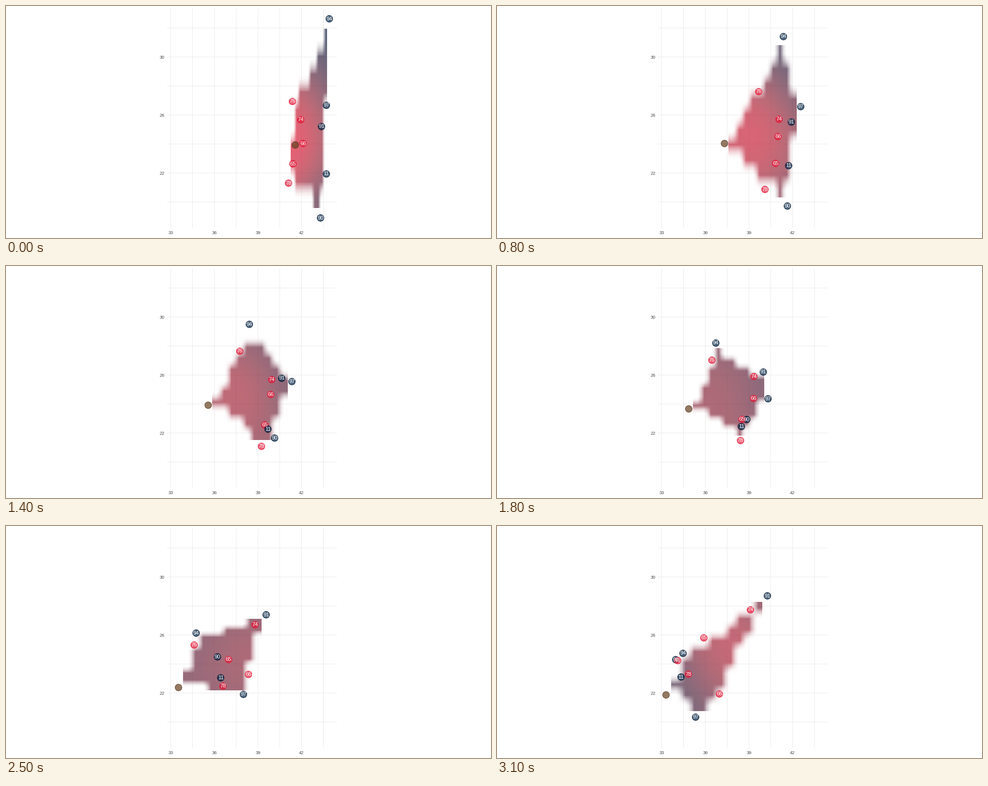
These frames come from a looping animation (1000x480 px, 3700 ms). A matplotlib script:

```python
import numpy as np
import matplotlib.pyplot as plt
from matplotlib.animation import FuncAnimation
from matplotlib.patches import Circle, Rectangle

W, H, DPI = 1000, 480, 100
PX = 72 / DPI  # points per pixel
FRAMES, LAST_MOVE = 37, 31
CELLS, MARGIN = 10, 0.05
ALPHA = 0.7
REACH = 95               # spread of a player's influence, in pixels
LOW, HIGH = 0.25, 0.9    # control values shown as pure blue and pure red

RED = np.array([227, 24, 55]) / 255
BLUE = np.array([0, 34, 68]) / 255
BROWN = np.array([101, 65, 31]) / 255
RED_LAB = np.array([48.6, 71.9, 38.7])
BLUE_LAB = np.array([13.0, 3.6, -24.8])

# Waypoints in pixels, spread evenly over the moving part of the loop
BLUES = {
    "90": [(648, 438), (600, 415), (540, 341), (455, 276), (368, 276)],
    "94": [(666, 26), (593, 61), (481, 135), (401, 207), (383, 263)],
    "97": [(660, 205), (627, 207), (578, 250), (509, 332), (409, 395)],
    "91": [(650, 249), (608, 240), (560, 228), (535, 193), (557, 144)],
    "11": [(660, 347), (603, 330), (525, 337), (459, 316), (379, 312)],
}
REDS = {
    "76": [(590, 197), (541, 177), (467, 180), (397, 235), (372, 278)],
    "74": [(607, 235), (582, 234), (540, 233), (514, 211), (522, 173)],
    "66": [(612, 284), (580, 270), (538, 267), (509, 297), (458, 347)],
    "65": [(591, 326), (575, 325), (522, 326), (469, 287), (426, 231)],
    "78": [(582, 366), (553, 379), (518, 369), (461, 338), (394, 306)],
}
BALL = [(596, 287), (545, 286), (472, 284), (434, 285), (407, 290),
        (388, 300), (363, 324), (349, 343), (348, 349)]

names = [*BLUES, *REDS]
sign = np.array([1 if n in REDS else -1 for n in names])
paths = [np.array(p) + 0.5 for p in [*BLUES.values(), *REDS.values(), BALL]]


def along(path, progress):
    """Point on a smooth curve through the waypoints, progress 0 to 1."""
    s = progress * (len(path) - 1)
    k = min(int(s), len(path) - 2)
    u = s - k
    slope = np.gradient(path, axis=0, edge_order=2)
    return ((1 + 2 * u) * (1 - u) ** 2 * path[k] + u * (1 - u) ** 2 * slope[k]
            + u * u * (3 - 2 * u) * path[k + 1] + u * u * (u - 1) * slope[k + 1])


def team_colour(share):
    """Blend blue to red in Lab space and return sRGB."""
    lab = BLUE_LAB + share[..., None] * (RED_LAB - BLUE_LAB)
    fy = (lab[..., 0] + 16) / 116
    f = np.stack([fy + lab[..., 1] / 500, fy, fy - lab[..., 2] / 200], axis=-1)
    xyz = np.where(f > 6 / 29, f ** 3, (f - 4 / 29) * 0.12842) * [0.9505, 1, 1.089]
    to_rgb = np.array([[3.2406, -1.5372, -0.4986],
                       [-0.9689, 1.8758, 0.0415],
                       [0.0557, -0.2040, 1.0570]])
    lin = np.clip(xyz @ to_rgb.T, 0, 1)
    return np.where(lin > 0.0031308, 1.055 * lin ** (1 / 2.4) - 0.055, 12.92 * lin)


def in_hull(grid, pts):
    """A point is inside when no half-plane around it is empty of pts."""
    d = pts - grid[..., None, :]
    ang = np.sort(np.arctan2(d[..., 1], d[..., 0]), axis=-1)
    gaps = np.diff(ang, axis=-1, append=ang[..., :1] + 2 * np.pi)
    return gaps.max(axis=-1) < np.pi - 0.01


def red_share(grid, players):
    """Logistic balance of the two teams' Gaussian influence."""
    dist2 = ((grid[:, :, None] - players) ** 2).sum(axis=-1)
    balance = (sign * np.exp(-dist2 / (2 * REACH ** 2))).sum(axis=-1)
    control = 1 / (1 + np.exp(-balance))
    return np.clip((control - LOW) / (HIGH - LOW), 0, 1)


def stretch(cells, size, axis):
    """Enlarge one axis linearly, in steps of 1/16 cell."""
    pos = np.floor(np.maximum(np.arange(size) * 16 * CELLS / size - 8, 0)) / 16
    pos = np.minimum(pos, CELLS - 1)
    low = pos.astype(int)
    high = np.minimum(low + 1, CELLS - 1)
    mix = np.expand_dims(pos - low, (1 - axis, 2))
    return cells.take(low, axis) * (1 - mix) + cells.take(high, axis) * mix


def control_layer(pts):
    lo, hi = pts.min(axis=0), pts.max(axis=0)
    steps = MARGIN + np.arange(CELLS) / CELLS
    gx, gy = np.meshgrid(*(lo[i] + steps * (hi[i] - lo[i]) for i in (0, 1)))
    grid = np.stack([gx, gy], axis=-1)

    cells = np.full((CELLS, CELLS, 4), ALPHA)
    cells[..., :3] = team_colour(red_share(grid, pts[:-1]))
    cells[~in_hull(grid, pts)] = (1, 1, 1, 0)

    inset = MARGIN * (hi - lo)
    x0, y0 = np.rint(lo + inset).astype(int)
    x1, y1 = np.rint(hi - inset).astype(int)
    layer = np.zeros((H, W, 4))
    layer[y0:y1, x0:x1] = stretch(stretch(cells, y1 - y0, 0), x1 - x0, 1)
    return layer


plt.rcParams["font.family"] = "Liberation Sans"
fig = plt.figure(figsize=(W / DPI, H / DPI), dpi=DPI, facecolor="white")
ax = fig.add_axes([0, 0, 1, 1])
ax.axis("off")
image = ax.imshow(np.zeros((H, W, 4)), extent=(0, W, H, 0), aspect="auto",
                  interpolation="nearest", zorder=2)
ax.set_xlim(0, W)
ax.set_ylim(H, 0)


def add_line(x, y, w, h):
    ax.add_patch(Rectangle((x, y), w, h, fc="#ebebeb", lw=0,
                           antialiased=False, zorder=1))


def add_text(x, y, text, size, **style):
    return ax.text(x, y, text, fontsize=size * PX, va="center", **style)


for x in range(339, 655, 45):
    add_line(x, 5, 1, 454)
for y in range(45, 406, 60):
    add_line(332, y, 350, 1)
for i in range(4):
    add_text(339.5 + 90 * i, 470, 33 + 3 * i, 9.4, color="#4d4d4d", ha="center")
for i in range(3):
    add_text(327.5, 106.5 + 120 * i, 30 - 4 * i, 9.4, color="#4d4d4d", ha="right")


def add_dot(colour, edge, z):
    dot = Circle((0, 0), 7, fc=(*colour, ALPHA), ec=(*edge, 0.8), lw=PX, zorder=z)
    return ax.add_patch(dot)


dots, labels = [], []
for name in names:
    colour, edge = (RED, RED) if name in REDS else (BLUE, BLUE * 0.6)
    z = 5 if name == "11" else 4 if name in REDS else 3
    dots.append(add_dot(colour, edge, z))
    labels.append(add_text(0, 0, name, 11.2, color="white", ha="center", zorder=7))
dots.append(add_dot(BROWN, BROWN * 0.8, 6))


def draw(i):
    progress = min(i / LAST_MOVE, 1)
    pts = np.array([along(p, progress) for p in paths])
    image.set_data(control_layer(pts))
    for dot, p in zip(dots, pts):
        dot.center = p
    for label, p in zip(labels, pts):
        label.set_position(p)
    return [image, *dots, *labels]


anim = FuncAnimation(fig, draw, frames=FRAMES, interval=100, repeat=True,
                     repeat_delay=0, blit=False)
plt.show()
```
